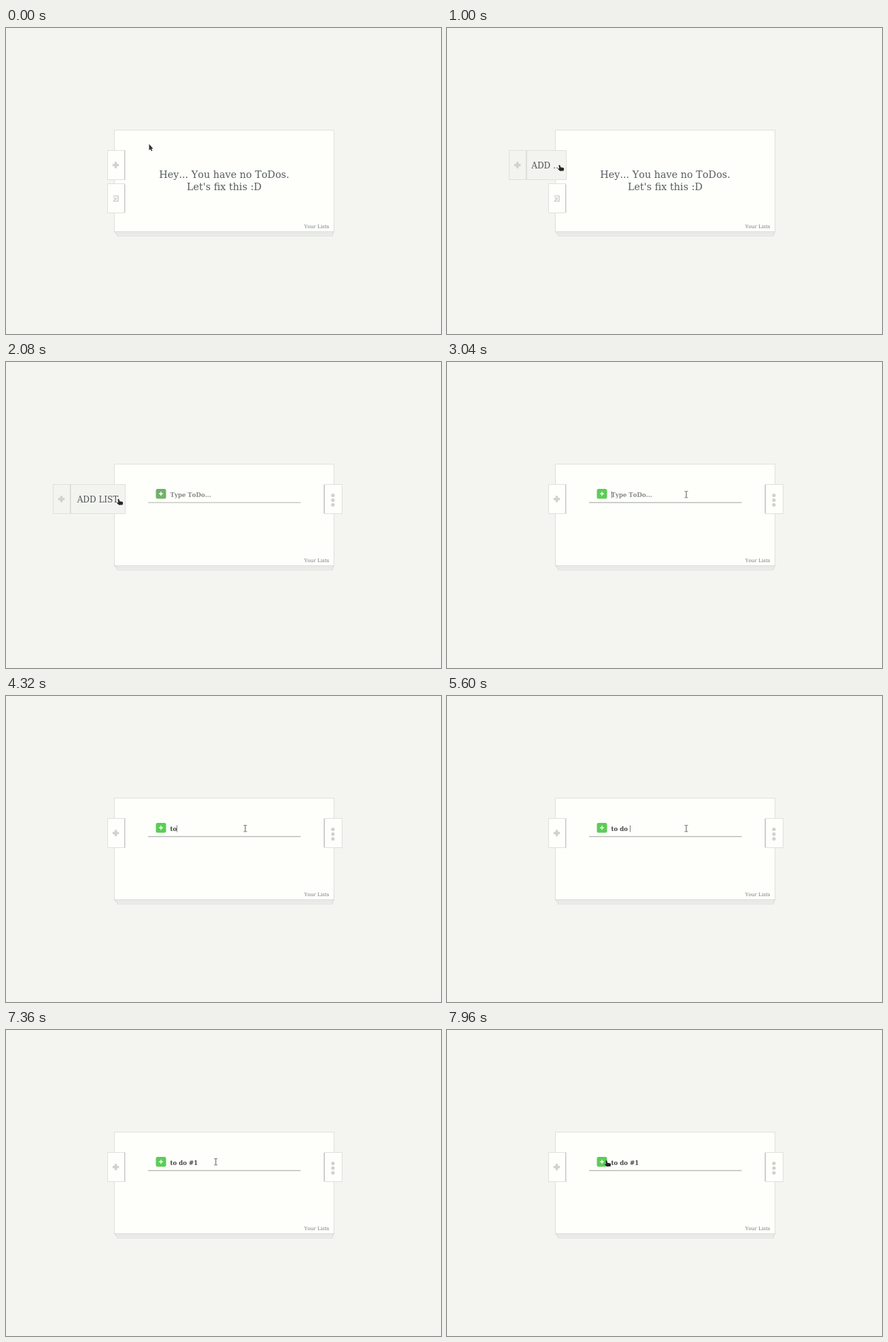
Write an HTML page with a canvas that moves like this. It is 640 px wide and 451 px high and loops after 8 s.

```html
<!DOCTYPE html>
<html lang="en">
<head>
<meta charset="utf-8">
<title>To-do card</title>
<style>
  html, body { margin: 0; width: 100%; height: 100%; overflow: hidden; background: #f4f5f0; }
  canvas { display: block; width: 640px; height: 451px; }
</style>
</head>
<body>
<canvas id="stage" width="640" height="451"></canvas>
<script>
const ctx = document.getElementById('stage').getContext('2d');
const LOOP = 8000;
const SERIF = '"DejaVu Serif", serif';
const BG = '#f4f5f0', PAPER = '#fefffb', EDGE = '#dee0db', SHADE = '#c5c8c3', ICON = '#d0d2ce';

const OPEN = 829, SWITCH = 1660, CLOSE = 2440, FOCUS = 2960;
const TYPED = 'to do #1';
const KEYS = [4080, 4260, 4560, 4760, 5000, 5240, 5960, 6400];

const clamp = v => Math.max(0, Math.min(1, v));
const span = (t, start, length) => clamp((t - start) / length);
const mix = (a, b, p) => a + (b - a) * p;
const smooth = p => p * p * (3 - 2 * p);
const mixColor = (a, b, p) => `rgb(${a.map((v, i) => Math.round(mix(v, b[i], p)))})`;

// CSS "ease": cubic-bezier(.25, .1, .25, 1)
function ease(x) {
  let lo = 0, hi = 1;
  for (let i = 0; i < 20; i++) {
    const s = (lo + hi) / 2, r = 1 - s;
    if (0.75 * r * r * s + 0.75 * r * s * s + s * s * s < x) lo = s; else hi = s;
  }
  const r = 1 - lo;
  return 0.3 * r * r * lo + 3 * r * lo * lo + lo * lo * lo;
}

function rect(x, y, w, h, color) {
  ctx.fillStyle = color;
  ctx.fillRect(x, y, w, h);
}

function frame(x, y, w, h, fill, stroke) {
  rect(x, y, w, h, fill);
  ctx.strokeStyle = stroke;
  ctx.lineWidth = 1;
  ctx.strokeRect(x + 0.5, y + 0.5, w - 1, h - 1);
}

function text(str, x, y, size, color, align = 'left', weight = '') {
  ctx.font = `${weight} ${size}px ${SERIF}`;
  ctx.fontKerning = 'none';
  ctx.textAlign = align;
  ctx.fillStyle = color;
  ctx.fillText(str, x, y);
}

function plus(x, y, arm, thick, color) {
  rect(x - arm, y - thick / 2, arm * 2, thick, color);
  rect(x - thick / 2, y - arm, thick, arm * 2, color);
}

function shape(points, fill) {
  ctx.beginPath();
  points.forEach(([x, y]) => ctx.lineTo(x, y));
  ctx.closePath();
  ctx.fillStyle = fill;
  ctx.fill();
}

function faded(alpha, draw) {
  if (alpha <= 0) return;
  ctx.save();
  ctx.globalAlpha = alpha;
  draw();
  ctx.restore();
}

function card() {
  frame(163, 302, 318, 5, '#eff1ec', '#dcded9');
  frame(161, 300, 321, 4, '#eff1ec', '#dbddd8');
  frame(159, 150, 324, 151, PAPER, EDGE);
  rect(159, 300, 324, 1, '#cfd1cc');
  text('Your Lists', 475.5, 295, 7.2, '#757977', 'right');
}

function fit(str, room) {
  if (ctx.measureText(str).width <= room) return str;
  for (let n = str.length - 1; n > 0; n--) {
    const cut = str.slice(0, n) + '…';
    if (ctx.measureText(cut).width <= room) return cut;
  }
  return '';
}

function addTab(t) {
  const open = ease(span(t, OPEN, 400)) - ease(span(t, CLOSE, 400));
  const left = 149 - 80 * open, fold = left + 25;
  const fill = mixColor([254, 255, 251], [243, 244, 240], clamp(open * 1.5));
  frame(left, 180, 176 - left, 44, fill, EDGE);
  rect(fold, 181, 1, 42, mixColor([197, 200, 195], [212, 214, 209], open));
  rect(fold + 1, 181, 1, 42, '#e4e6e1');
  plus(left + 12.5, 202, 4.7, 3.4, ICON);
  if (open > 0.05) {
    ctx.save();
    ctx.beginPath();
    ctx.rect(fold + 2, 181, 174 - fold, 42);
    ctx.clip();
    ctx.font = `12px ${SERIF}`;
    text(fit('ADD LIST', 161 - fold), (fold + 176) / 2, 207, 12, '#4d5150', 'center');
    ctx.restore();
  }
}

function lowerTab() {
  frame(149, 229, 26, 44, PAPER, EDGE);
  rect(174, 230, 1, 42, SHADE);
  rect(175, 231, 1, 41, '#e4e6e1');
  ctx.strokeStyle = ICON;
  ctx.lineWidth = 1.6;
  ctx.beginPath();
  ctx.moveTo(157.5, 247.5);
  ctx.lineTo(165, 247.5);
  ctx.lineTo(165, 255.2);
  ctx.lineTo(157.5, 255.2);
  ctx.moveTo(163, 250);
  ctx.lineTo(158.5, 254.5);
  ctx.moveTo(158.5, 249.5);
  ctx.lineTo(162.5, 253);
  ctx.stroke();
}

function menuTab(p) {
  ctx.save();
  ctx.translate(mix(-14, 0, ease(p)), 0);
  frame(468, 180, 27, 44, PAPER, EDGE);
  rect(468, 181, 1, 42, '#bcc0bb');
  rect(467, 181, 1, 42, '#e0e2dd');
  ctx.fillStyle = ICON;
  for (const y of [196.5, 203.5, 210.5]) {
    ctx.beginPath();
    ctx.arc(481, y, 2.6, 0, Math.PI * 2);
    ctx.fill();
  }
  ctx.restore();
}

function emptyNote() {
  text('Hey... You have no ToDos.', 321, 221, 14.4, '#555c5d', 'center');
  text("Let's fix this :D", 321, 238.5, 14.4, '#555c5d', 'center');
}

function entry(t) {
  const focus = span(t, FOCUS - 160, 200);
  const count = KEYS.filter(k => k <= t).length;
  const str = TYPED.slice(0, count);
  ctx.fillStyle = mixColor([114, 176, 108], [92, 204, 88], focus);
  ctx.beginPath();
  ctx.roundRect(220.5, 187, 15, 14.5, 2.5);
  ctx.fill();
  plus(228, 194.2, 3, 1.5, '#f6fff4');
  rect(209, 206.5, 224.5, 1.5, mixColor([199, 203, 196], [186, 191, 185], focus));
  if (count) text(str, 241.5, 199, 8.6, '#404441', 'left', 'bold');
  else text('Type ToDo...', 241.5, 199, 8.6, '#858983', 'left', 'bold');
  const last = count ? KEYS[count - 1] : FOCUS;
  if (t >= FOCUS && Math.floor((t - last) / 500) % 2 === 0) {
    const x = 241.5 + (count ? ctx.measureText(str).width : 0);
    rect(Math.round(x), 190.5, 0.9, 10, '#6b706c');
  }
}

const CURSORS = {
  arrow() {
    shape([[0, 0], [0, 9.2], [2, 7.4], [3.4, 10.5], [4.9, 9.8], [3.5, 6.9], [5.9, 6.7]], '#303231');
  },
  hand() {
    shape([[-1.6, 0.3], [-0.3, -0.2], [0.6, 0.9], [1, 3.2], [5.4, 3.9], [6.2, 5.2], [5.6, 8.6],
      [0.2, 8.8], [-3, 5.7], [-2.4, 4.8], [-0.8, 5.4]], '#252726');
  },
  beam() {
    const c = '#8b8f8c';
    rect(-2.5, -5, 5, 1.2, c);
    rect(-2.5, 4.2, 5, 1.2, c);
    rect(-0.7, -5, 1.5, 10, c);
  }
};

function pointer(t) {
  let x = 210.5, y = 171;
  // start, length, x, y
  const moves = [[120, 740, 166, 202], [2370, 450, 352, 195], [7080, 680, 235, 192.5]];
  for (const [start, length, tx, ty] of moves) {
    const p = smooth(span(t, start, length));
    x = mix(x, tx, p);
    y = mix(y, ty, p);
  }
  let kind = 'arrow';
  if (t > SWITCH) {
    if (x < 176 || (x < 237 && t > FOCUS)) kind = 'hand';
    else if (x > 238 && x < 434) kind = 'beam';
  } else if (x < 175) kind = 'hand';
  ctx.save();
  ctx.translate(x, y);
  CURSORS[kind]();
  ctx.restore();
}

function draw(t) {
  rect(0, 0, 640, 451, BG);
  card();
  const swap = span(t, SWITCH, 280);
  faded(1 - clamp(swap * 2), () => {
    emptyNote();
    lowerTab();
  });
  faded(clamp(swap * 2 - 0.6), () => {
    entry(t);
    menuTab(swap);
  });
  addTab(t);
  pointer(t);
}

const begin = performance.now();
function tick() {
  draw((performance.now() - begin) % LOOP);
  requestAnimationFrame(tick);
}
tick();
</script>
</body>
</html>
```
